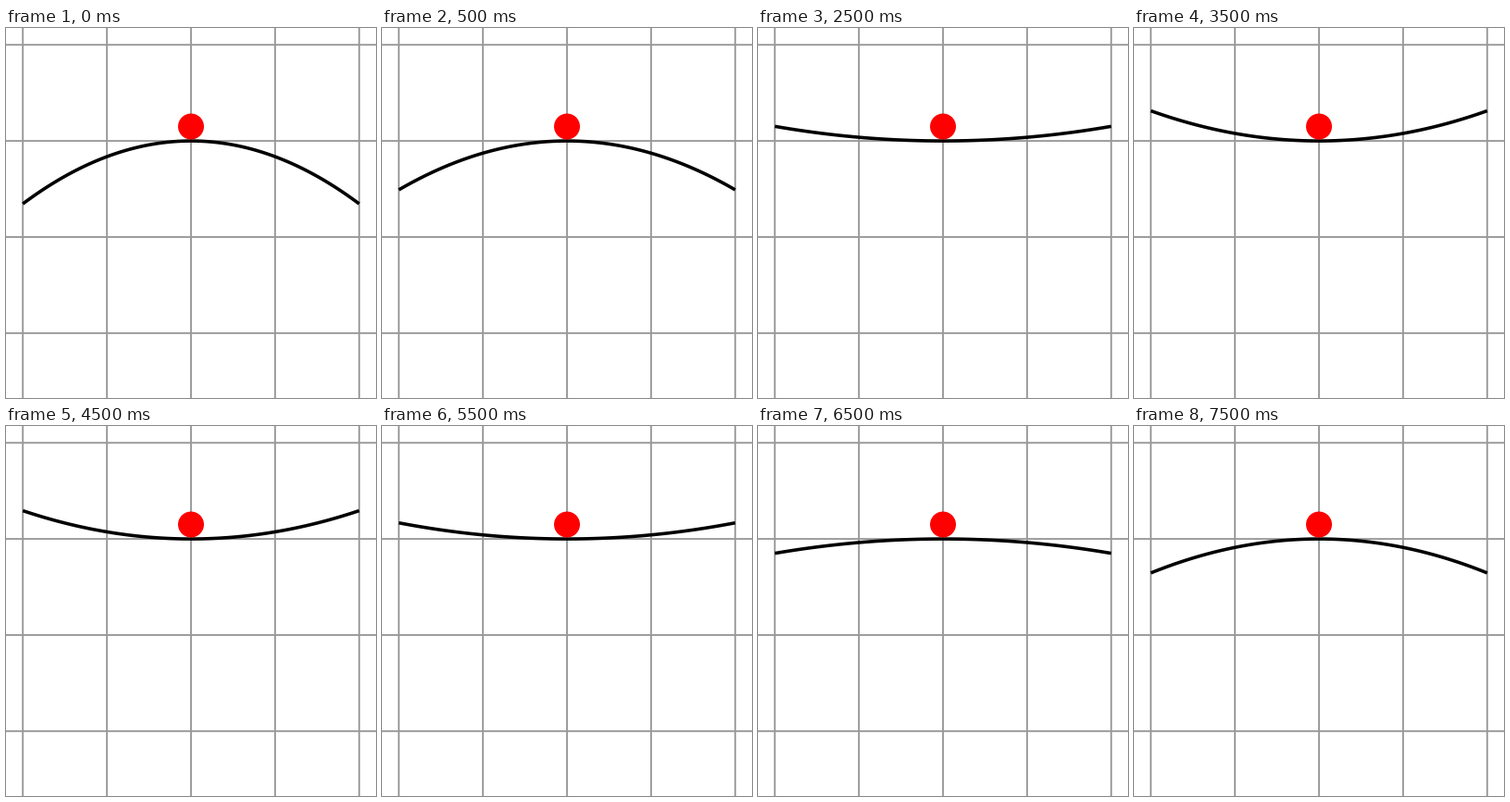
A matplotlib script for the animation above (8 s loop, 400 by 400 pixels).

```python
import numpy as np
import matplotlib.pyplot as plt
from matplotlib.animation import FuncAnimation
from matplotlib.patches import Circle

SIZE, DPI = 400, 100
PX = 72 / DPI  # points per pixel
FRAMES = 16
MARGIN = SIZE / 22
HALF = SIZE / 2 - MARGIN
MID_X = SIZE / 2
ROW = 2 * HALF / 3.5
TOP_Y = MARGIN + ROW

# Key poses of the curve: step, drop of the ends in pixels, rate per step
KEYS = [(0, 68, -13.5), (4, -0.7, -17), (8, -33.2, 2.2), (12, -3.6, 17), (15, 36.8, -5)]


def drop(step):
    """Cubic Hermite easing between the key poses."""
    for (t0, a, va), (t1, b, vb) in zip(KEYS, KEYS[1:]):
        if step <= t1:
            break
    h = t1 - t0
    s = (step - t0) / h
    ease = s * s * (3 - 2 * s)
    return (a + (b - a) * ease
            + h * va * s * (1 - s)**2 - h * vb * s * s * (1 - s))


fig = plt.figure(figsize=(SIZE / DPI, SIZE / DPI), dpi=DPI, facecolor="white")
ax = fig.add_axes([0, 0, 1, 1])
ax.set_xlim(0, SIZE)
ax.set_ylim(SIZE, 0)
ax.axis("off")

grid = dict(color="#999999", lw=1.9 * PX, zorder=1, snap=False)
for k in range(-2, 3):
    ax.axvline(MID_X + k * HALF / 2, **grid)
for k in range(4):
    ax.axhline(MARGIN + k * ROW, **grid)

u = np.linspace(-1, 1, 121)
curve, = ax.plot(MID_X + HALF * u, TOP_Y + drop(0) * u**2, color="black",
                 lw=3.6 * PX, solid_capstyle="butt", zorder=2)
ax.add_patch(Circle((MID_X, TOP_Y - 0.15 * ROW), 14, fc="red", ec="none", zorder=3))


def update(i):
    curve.set_ydata(TOP_Y + drop(i) * u**2)
    return curve,


anim = FuncAnimation(fig, update, frames=FRAMES, interval=500,
                     repeat=True, repeat_delay=0)
plt.show()
```
